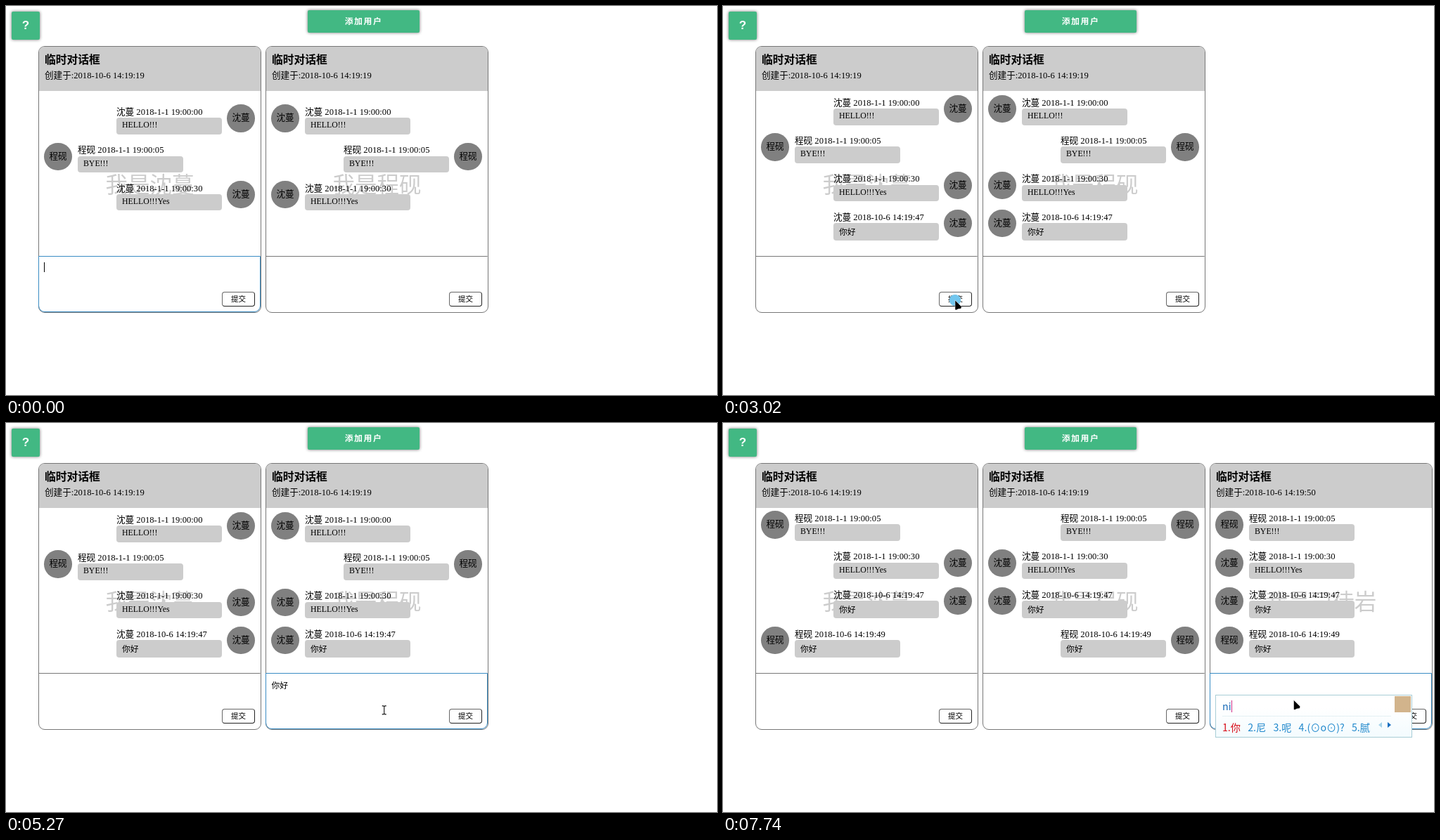
Animation, 1011 px wide and 554 px high, one loop 8 s. Source, as an HTML page:

```html
<!DOCTYPE html>
<html lang="zh-CN">
<head>
<meta charset="utf-8">
<title>临时对话框</title>
<style>
html, body { margin: 0; width: 100%; height: 100%; overflow: hidden; background: #fff; }
body { position: relative; color: #000; font: 12.6px/20px "Liberation Serif", "Noto Sans CJK SC", serif; white-space: nowrap; cursor: default; }
body div, body svg { position: absolute; box-sizing: border-box; }
.green { background: #42b883; color: #fff; border-radius: 2px; box-shadow: 0 0 4px rgba(0,0,0,.55); text-align: center; font-weight: bold; font-family: "Liberation Sans", "Noto Sans CJK SC", sans-serif; }
#help { left: 8px; top: 8px; width: 40px; height: 39.5px; font-size: 17px; line-height: 39px; }
#add { left: 429px; top: 6px; width: 159px; height: 32px; font-size: 11.9px; line-height: 33px; letter-spacing: 1.5px; }
#add.down { box-shadow: 0 0 6px rgba(0,0,0,.8); }
.panel { top: 57px; width: 317px; height: 380px; }
.box { inset: 0; border: 1px solid #777; border-radius: 9px; overflow: hidden; }
.head { left: 0; top: 0; width: 100%; height: 63px; background: #ccc; }
.head div { left: 8px; }
.title { top: 9px; font-size: 15.75px; font-weight: bold; }
.sub { top: 31px; }
.body { left: -1px; top: 63px; width: 317px; height: 235px; overflow: hidden; }
.mark { left: 0; top: 115px; width: 100%; line-height: 40px; font-size: 31.5px; text-align: center; color: #ccc; }
.list { left: 0; width: 100%; }
.face { width: 39.4px; height: 39.4px; border-radius: 50%; background: #808080; text-align: center; line-height: 39.4px; }
.who { top: .7px; }
.bubble { top: 19px; width: 149.6px; background: #ccc; border-radius: 4px; padding-left: 8px; font-size: 11.8px; }
.field { left: 0; top: 299px; width: 316px; height: 80px; border: 1px solid transparent; border-top-color: #777; border-radius: 0 0 9px 9px; font-size: 11.8px; }
.field.on { border-color: #3a8cc4; }
.text { left: 7.4px; top: 7px; }
.caret { width: 1px; height: 14px; background: #000; }
.send { left: 261px; top: 350px; width: 47px; height: 21px; border: 1px solid #222; border-top-color: #666; border-left-color: #666; border-radius: 4px; background: #fff; text-align: center; font-size: 10.5px; line-height: 20px; }
#ime { top: 387px; height: 61px; border: 1px solid #a8cdd6; background: linear-gradient(#fff 30%, #f3fbfe); color: #2088cc; font: 14.2px/20px "Noto Sans CJK SC", sans-serif; }
#typed { left: 9px; top: 5px; color: #1a6cb8; }
#typed.bar { border-right: 1px solid #d0308a; height: 17px; top: 7px; line-height: 16px; }
#rule { left: 9px; right: 29px; top: 29px; height: 1px; background: #e4f1f4; }
#picks { left: 9px; top: 35px; display: flex; gap: 10.2px; }
#picks span:first-child { color: #d80c18; }
#picks i { width: 18px; height: 20px; margin: 0 -7px 0 2px; position: relative; }
#picks i::before, #picks i::after { content: ""; position: absolute; top: 3px; border: 4px solid transparent; }
#picks i::before { left: 0; border-left-width: 0; border-right: 5px solid #a5d3ea; }
#picks i::after { left: 13px; border-right-width: 0; border-left: 5px solid #1a6fc0; }
#badge { right: 1px; top: 1px; width: 23px; height: 23px; background: #d2b48c; }
#ring { border-radius: 50%; background: #72c6ee; }
#mouse { left: 0; top: 0; width: 30px; height: 30px; overflow: visible; }
</style>
</head>
<body>
<div id="help" class="green">?</div>
<div id="add" class="green">添加用户</div>
<div id="panels"></div>
<div id="ime"><div id="typed"></div><div id="rule"></div><div id="picks"></div><div id="badge"></div></div>
<div id="ring"></div>
<svg id="mouse">
  <path id="arrow" d="M0 0L9.3 9.3L8.5 12L4.5 12.5L1.5 14L0 13.5Z" fill="#000" stroke="#fff" stroke-width=".5"/>
  <path id="beam" d="M-3 -6H-1L0 -5L1 -6H3M0 -5V5M-3 6H-1L0 5L1 6H3" fill="none" stroke="#111" stroke-width="1.1"/>
</svg>
<script>
const LOOP = 8000, PITCH = 323, LEFT = 46;
const A = '沈蔓', B = '程砚', C = '司徒岩';
const users = [[A, '14:19:19'], [B, '14:19:19'], [C, '14:19:50']];
const messages = [
  [A, '2018-1-1 19:00:00', 'HELLO!!!'],
  [B, '2018-1-1 19:00:05', 'BYE!!!'],
  [A, '2018-1-1 19:00:30', 'HELLO!!!Yes'],
  [A, '2018-10-6 14:19:47', '你好'],
  [B, '2018-10-6 14:19:49', '你好'],
];
const isWide = text => text > '一';
const tops = [0, 54.3, 108.6, 162.9, 218.9];

// '<>' stands for the pair of page arrows
const picks = {
  n: [280, '你 那 呢 能 年 <>'],
  ni: [280, '你 尼 呢 (⊙o⊙)? 腻 <>'],
  "ni'h": [361, '你好 你会 你和 你还 <> 你很'],
  "ni'ha": [361, '你哈 你好 你还 泥蛤 <> 你喊'],
  "ni'hao": [361, '你好 你号 拟好 泥嚎 <> 字符画:你好'],
};

const steps = [
  [0, { focus: 0, text: '', caret: 1, ime: '', bar: 0, count: 3, panels: 2, down: 0 }],
  [130, { caret: 0 }],
  [590, { text: 'n', caret: 1 }],
  [1150, { caret: 0 }],
  [1190, { text: '', caret: 1 }],
  [1500, { ime: 'n', bar: 1 }],
  [1620, { ime: 'ni' }],
  [1700, { caret: 0 }],
  [1780, { ime: "ni'h", bar: 0 }],
  [1860, { ime: "ni'ha" }],
  [1920, { ime: "ni'hao" }],
  [1960, { bar: 1 }],
  [2130, { ime: '', bar: 0 }],
  [2170, { text: '你好', caret: 1 }],
  [2690, { caret: 0 }],
  [2960, { focus: -1, text: '', count: 4 }],
  [3400, { focus: 1, caret: 1 }],
  [3760, { caret: 0 }],
  [4010, { ime: 'n' }],
  [4050, { ime: 'ni' }],
  [4090, { bar: 1 }],
  [4280, { ime: "ni'h", bar: 0, caret: 1 }],
  [4320, { ime: "ni'ha" }],
  [4360, { ime: "ni'hao" }],
  [4400, { bar: 1 }],
  [4480, { ime: '', bar: 0, text: '你好' }],
  [4990, { caret: 0 }],
  [5480, { caret: 1 }],
  [5620, { focus: -1, text: '', count: 5 }],
  [6480, { down: 1 }],
  [6560, { down: 0, panels: 3 }],
  [7170, { focus: 2, caret: 1 }],
  [7570, { ime: 'n', caret: 0 }],
  [7660, { ime: 'ni' }],
  [7740, { bar: 1 }],
];

const path = [
  [2640, 286, 424], [2840, 330, 419], [3000, 330, 419], [3360, 428.5, 396.5],
  [4990, 428.5, 396.5], [5480, 640.5, 420.5], [5600, 640.5, 420.5], [5660, 641, 411],
  [5780, 641, 411], [5880, 473, 8], [5920, 472, -40], [6220, 470, -40],
  [6240, 468, 2], [6320, 464, 24], [6520, 464, 24], [6740, 815, 424],
  [6800, 815, 424], [7120, 811.5, 394.5], [LOOP, 811.5, 394.5],
];
const clicks = [[2920, 330, 419], [3380, 428.5, 396.5], [5610, 640.5, 420.5], [6480, 464, 24], [7150, 811.5, 394.5]];
const CLICK = 160;

const $ = id => document.getElementById(id);
const show = (el, on) => { el.style.visibility = on ? 'visible' : 'hidden'; };

function messageHtml([name, time, text], i, owner) {
  const mine = name === owner, x = mine ? 111 : 56;
  const h = isWide(text) ? 25.2 : 23.6, line = isWide(text) ? 26 : 21.5;
  return `<div class="message" style="left:0;top:${tops[i]}px">
    <div class="face" style="left:${mine ? 268.3 : 8.4}px">${name}</div>
    <div class="who" style="left:${x}px">${name} ${time}</div>
    <div class="bubble" style="left:${x}px;height:${h}px;line-height:${line}px">${text}</div></div>`;
}

$('panels').innerHTML = users.map(([name, time], i) => `
  <div class="panel" style="left:${LEFT + i * PITCH}px">
    <div class="box">
      <div class="head"><div class="title">临时对话框</div><div class="sub">创建于:2018-10-6 ${time}</div></div>
      <div class="body"><div class="mark">我是${name}</div>
        <div class="list">${messages.map((m, k) => messageHtml(m, k, name)).join('')}</div></div>
    </div>
    <div class="field"><div class="text"></div><div class="caret"></div></div>
    <div class="send">提交</div>
  </div>`).join('');

const panels = [...document.querySelectorAll('.panel')].map(el => ({
  el, list: el.querySelector('.list'), rows: [...el.querySelectorAll('.message')],
  field: el.querySelector('.field'), text: el.querySelector('.text'), caret: el.querySelector('.caret'),
}));

function stateAt(t) {
  return Object.assign({}, ...steps.filter(s => s[0] <= t).map(s => s[1]));
}

function drawPanels(s) {
  const scroll = s.count === 3 ? 19.3 : 169 - tops[s.count - 1];
  panels.forEach((p, i) => {
    const on = i === s.focus;
    p.el.style.display = i < s.panels ? '' : 'none';
    p.list.style.top = scroll + 'px';
    p.rows.forEach((row, k) => { row.style.display = k < s.count ? '' : 'none'; });
    p.field.classList.toggle('on', on);
    p.text.textContent = on ? s.text : '';
    p.caret.style.display = on && s.caret ? '' : 'none';
    p.caret.style.left = Math.round(7 + (on ? p.text.offsetWidth : 0)) + 'px';
    p.caret.style.top = (on && isWide(s.text) ? 10 : 8) + 'px';
  });
}

let shown = null;
function drawIme(s) {
  show($('ime'), s.ime);
  if (!s.ime) return;
  const [width, words] = picks[s.ime];
  $('ime').style.left = LEFT + 8 + s.focus * PITCH + 'px';
  $('ime').style.width = width + 'px';
  $('typed').textContent = s.ime;
  $('typed').className = s.bar ? 'bar' : '';
  if (shown === s.ime) return;
  shown = s.ime;
  let n = 0;
  $('picks').innerHTML = words.split(' ')
    .map(w => w === '<>' ? '<i></i>' : `<span>${++n}.${w}</span>`).join('');
}

function mouseAt(t) {
  const k = path.findIndex(p => p[0] > t);
  if (k < 1) return null;
  const [t0, x0, y0] = path[k - 1], [t1, x1, y1] = path[k];
  const u = (t - t0) / (t1 - t0), e = u * u * (3 - 2 * u);
  return [x0 + (x1 - x0) * e, y0 + (y1 - y0) * e];
}

function drawMouse(t, s) {
  const pos = mouseAt(Math.floor(t / 40) * 40);
  $('mouse').style.display = pos ? '' : 'none';
  if (pos) {
    const [x, y] = pos, dx = (x - LEFT) % PITCH;
    const onSend = dx > 261 && dx < 308 && y > 407 && y < 428;
    const typing = !s.ime && y > 357 && y < 436 && !onSend;
    $('mouse').style.transform = `translate(${x}px,${y}px)`;
    $('arrow').style.display = typing ? 'none' : '';
    $('beam').style.display = typing ? '' : 'none';
  }
  const hit = clicks.find(c => t >= c[0] && t < c[0] + CLICK);
  show($('ring'), hit);
  if (hit) {
    const r = 4 + 6 * (t - hit[0]) / CLICK;
    $('ring').style.cssText += `;left:${hit[1] - r}px;top:${hit[2] - r}px;width:${2 * r}px;height:${2 * r}px`;
  }
}

function draw(t) {
  const s = stateAt(t);
  $('add').classList.toggle('down', !!s.down);
  drawPanels(s);
  drawIme(s);
  drawMouse(t, s);
}

const start = performance.now();
function tick() {
  draw((performance.now() - start) % LOOP);
  requestAnimationFrame(tick);
}
tick();
</script>
</body>
</html>
```
